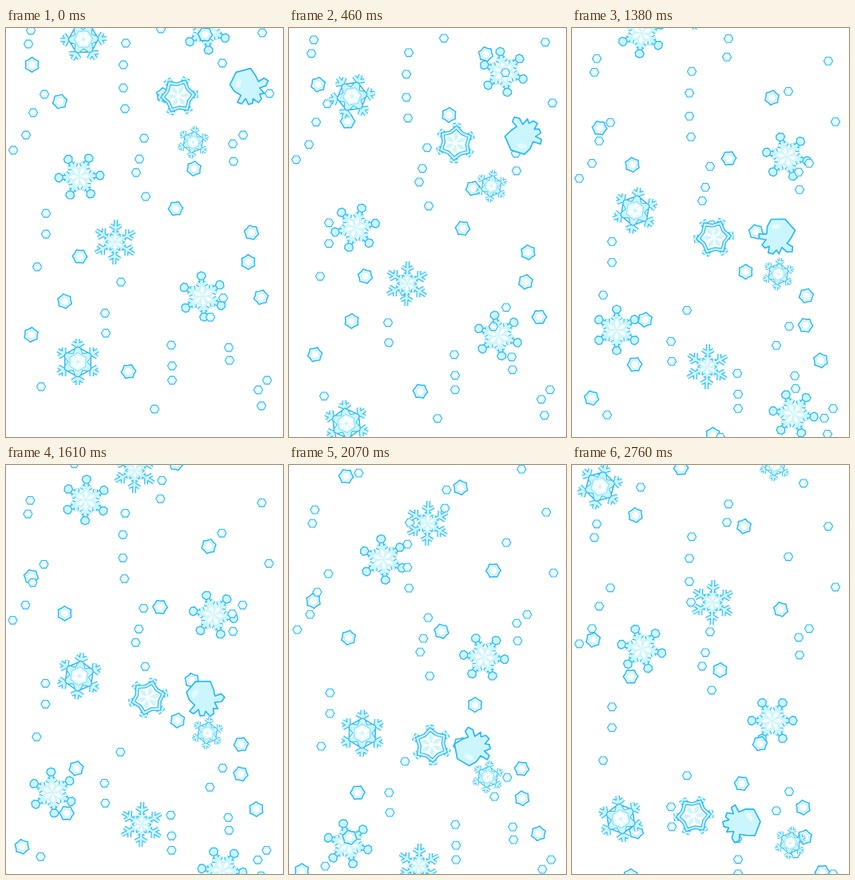
Write an HTML page with a canvas that moves like this. It is 347 px wide and 512 px high and loops after 2990 ms.

```html
<!DOCTYPE html>
<html lang="en">
<head>
<meta charset="utf-8">
<title>Falling snow</title>
<style>
html, body { margin: 0; width: 100%; height: 100%; overflow: hidden; background: #fff; }
canvas { display: block; width: 347px; height: 512px; }
</style>
</head>
<body>
<canvas id="c" width="347" height="512"></canvas>
<script>
const g = document.getElementById('c').getContext('2d');
const BLUE = '#2ab8fc', MID = '#7fdcff', PALE = '#ccf6ff', ICE = '#e6fbff';
const STEP = 230, STEPS = 13;
g.lineJoin = 'round';

// Cosine wave with its top at `peak`
const wave = (u, period, peak) => Math.cos(2 * Math.PI * (u - peak) / period);

function poly(pts) {
  g.beginPath();
  pts.forEach(p => g.lineTo(p[0], p[1]));
  g.closePath();
}

// Six tips at radius r, six notches at radius inner
function star(r, inner, turn = 0) {
  const pts = [];
  for (let i = 0; i < 12; i++) {
    const a = (i * 30 + turn) * Math.PI / 180, q = i % 2 ? inner : r;
    pts.push([q * Math.sin(a), -q * Math.cos(a)]);
  }
  poly(pts);
}
const hex = (r, turn) => star(r, r * 0.866, turn);

function paint(fill, line, width) {
  if (fill) { g.fillStyle = fill; g.fill(); }
  if (line) { g.strokeStyle = line; g.lineWidth = width; g.stroke(); }
}

function six(draw) {
  for (let i = 0; i < 6; i++) {
    g.save();
    g.rotate(i * Math.PI / 3);
    draw();
    g.restore();
  }
}

// Six arms with paired twigs; each twig is [root, reach, rise]
function arms(from, to, twigs, width) {
  for (const [color, w] of [[BLUE, width + 2.2], [PALE, width]]) {
    g.strokeStyle = color;
    g.lineWidth = w;
    six(() => {
      g.beginPath();
      g.moveTo(0, -from);
      g.lineTo(0, -to);
      for (const [root, reach, rise] of twigs) {
        g.moveTo(-reach, -root - rise);
        g.lineTo(0, -root);
        g.lineTo(reach, -root - rise);
      }
      g.stroke();
    });
  }
}

function petals(r, w, color) {
  six(() => {
    poly([[0, -1], [w, -r * 0.65], [0, -r], [-w, -r * 0.65]]);
    paint(color);
  });
}

function ring() {
  arms(12, 29, [[20, 7, 4]], 3.4);
  hex(19, 0); paint(PALE, BLUE, 1.2);
  six(() => {
    g.rotate(Math.PI / 6);
    poly([[0, -12], [5, -16], [-5, -16]]);
    paint('#fff', BLUE, 1);
  });
  hex(11.5); paint(ICE, MID, 1);
  petals(9, 2.6, '#fff');
  hex(2.5); paint(PALE);
}

const shapes = {
  ring,
  small() { g.scale(0.7, 0.7); ring(); },
  bud() {
    arms(4, 23, [[13, 6, 4]], 4);
    six(() => {
      poly([[-2.5, -21], [2.5, -21], [5.5, -25], [4.5, -29], [0, -31], [-4.5, -29], [-5.5, -25]]);
      paint(PALE, BLUE, 1.3);
    });
    star(19, 11); paint(PALE);
    petals(13, 2.6, '#fff');
  },
  fern() {
    arms(2, 28, [[9, 5, 3], [17, 7, 4]], 2.8);
    star(14, 8); paint(PALE);
    petals(10, 1.8, '#fff');
  },
  frame() {
    arms(17, 25, [[22, 5, 0]], 3.4);
    star(22, 16.5); paint(PALE, BLUE, 1.3);
    star(17, 13); paint('#fff', BLUE, 1.2);
    petals(14, 3, PALE);
    hex(3); paint('#fff');
  },
  melt() {
    poly([[-17, -6], [-16, -16], [0, -23], [17, -15], [16, -4], [14, 4], [22, 5], [24, 11],
      [18, 14], [10, 11], [10, 20], [5, 17], [3, 23], [-3, 24], [-5, 16], [-9, 20],
      [-14, 18], [-12, 10], [-20, 12], [-23, 7], [-14, 3]]);
    paint(PALE, BLUE, 1.7);
    g.beginPath();
    g.ellipse(-7, -10, 6, 3, -0.5, 0, 7);
    paint(ICE);
  },
  chip() {
    star(9.3, 7.6); paint(ICE, BLUE, 1.5);
    hex(5.6); paint('#fff', '#b5efff', 1);
  },
  speck() {
    hex(5.6, 30); paint(ICE, BLUE, 1.1);
    hex(3.2, 30); paint('#fff', '#c4f3ff', 0.8);
  }
};

function put(kind, x, y, turn) {
  g.save();
  g.translate(x, y);
  g.rotate(turn * Math.PI / 180);
  shapes[kind]();
  g.restore();
}

// How each kind moves: px or degrees per two steps, sway in px
const habits = {
  ring: { fall: 71.5, sway: 18, period: 4, spin: -6 },
  small: { fall: 55, drift: 4, sway: 13, period: 5, peak: 1.9, turn: 8 },
  bud: { fall: 53, sway: 18, period: 6, spin: -6 },
  fern: { fall: 52, sway: 18, period: 8, turn: 2 },
  frame: { fall: 59, drift: -9, sway: 8, period: 4, spin: -20 },
  melt: { fall: 62.5, drift: -15, sway: 6, period: 6, spin: -99 }
};
const flake = (kind, own) => ({ kind, drift: 0, peak: 0, turn: 0, spin: 0, ...habits[kind], ...own });

const back = [
  flake('bud', { x: 74, y: 186, fall: 64, turn: 27, spin: -9 }),
  flake('bud', { x: 260, y: 2, peak: 2, turn: -6, spin: -4 }),
  flake('bud', { x: 262, y: 336, fall: 49, peak: 2.5, turn: -4 }),
  flake('bud', { x: 100, y: -217, fall: 74.5, period: 4, peak: 4.5, turn: 30, spin: -8 })
];
const front = [
  flake('fern', { x: 152, y: 268, peak: 3.3 }),
  flake('fern', { x: 160, y: -224, fall: 66, peak: 5.4 }),
  flake('ring', { x: 79, y: 14, turn: 28 }),
  flake('ring', { x: 72, y: 418, fall: 77 }),
  flake('ring', { x: 53, y: -402, turn: 51 }),
  flake('frame', { x: 211, y: 85, peak: 0.6, turn: 25 }),
  flake('small', { x: 244, y: 143 }),
  flake('small', { x: 225, y: -330 }),
  flake('melt', { x: 303, y: 73, peak: 1.5, turn: -40 })
];

// Start x, start y, drift
const chips = [
  [35, 46, -1], [70, 92, 1], [247, 8, 2], [200, 84, -2], [233, 176, 0], [215, 226, 0],
  [305, 256, -3], [301, 293, -2], [317, 337, -1], [95, 286, -2], [76, 342, 0], [34, 384, -4],
  [156, 430, 6], [40, -110, 7], [206, -96, 2], [139, -169, 0]
];

// Where each speck starts
const specks = [
  [31, 3], [28, 20], [150, 19], [194, 1], [196, -22], [321, 6], [147, 46],
  [271, 44], [147, 75], [149, 101], [330, 82], [48, 83], [34, 106], [25, 134],
  [9, 153], [173, 138], [297, 134], [284, 145], [285, 167], [167, 164], [163, 181],
  [175, 211], [50, 232], [50, 258], [39, 299], [144, 318], [124, 357], [125, 382],
  [272, 338], [256, 362], [207, 397], [279, 400], [280, 416], [208, 423], [208, 441],
  [327, 441], [316, 453], [320, 473], [186, 477], [44, 449], [290, -48], [86, -43]
];

function drawFlake(f, u) {
  const x = f.x + f.drift * u + f.sway * wave(u, f.period, f.peak);
  put(f.kind, x, f.y + f.fall * u, f.turn + f.spin * u);
}

function draw(u) {
  g.fillStyle = '#fff';
  g.fillRect(0, 0, 347, 512);
  back.forEach(f => drawFlake(f, u));
  const fall = 24 * u + 0.8 * u * u, zigzag = 2.5 * wave(u, 2, 1);
  chips.forEach(([x, y, drift], i) =>
    put('chip', x + drift * u + (x < 220 ? zigzag : -zigzag), y + fall, i * 17 + u * 12));
  const shift = 0.7 + 1.3 * wave(u, 3, 2);
  specks.forEach(([x, y]) => put('speck', x + shift, y + 11.8 * u, 0));
  front.forEach(f => drawFlake(f, u));
}

let last = -1;
function tick() {
  const step = Math.floor(performance.now() / STEP) % STEPS;
  if (step !== last) draw((last = step) / 2);
  requestAnimationFrame(tick);
}
tick();
</script>
</body>
</html>
```
